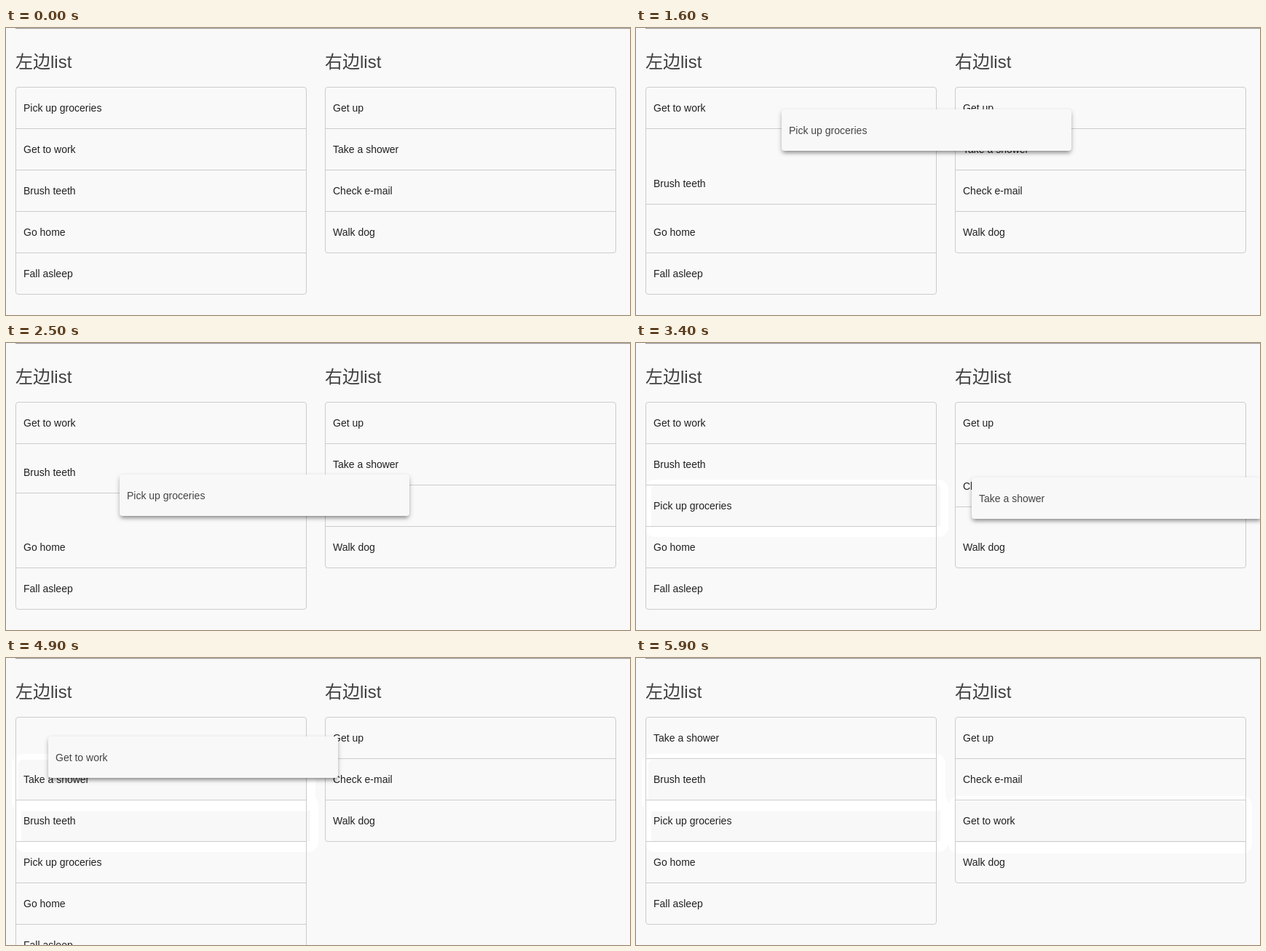
An HTML page for the animation above (6.5 s loop, 857 px wide and 395 px high).

```html
<!DOCTYPE html>
<html lang="zh-CN">
<head>
<meta charset="utf-8">
<title>Drag between lists</title>
<style>
  html, body { margin: 0; width: 100%; height: 100%; overflow: hidden; background: #f9f9f9; }
  body { position: relative; font: 14px "Liberation Sans", Arial, sans-serif; color: #212121; }
  .rule { position: absolute; left: 13px; right: 0; top: 0; height: 1px; background: #9a9a9a; border-bottom: 1px solid #eee; }
  h2 {
    position: absolute; top: 31px; margin: 0; white-space: nowrap; color: #404040;
    font: 400 24px/32px "Liberation Sans", "Noto Sans CJK SC", "Noto Sans CJK", sans-serif;
  }
  .left { left: 13px; }
  .right { left: 438px; }
  .list { position: absolute; top: 81px; width: 400px; box-sizing: border-box; border: 1px solid #ccc; border-radius: 4px; }
  .row, .preview {
    position: absolute; left: 0; top: 0; width: 398px; height: 57px; line-height: 56px;
    box-sizing: border-box; padding-left: 10px; white-space: nowrap;
  }
  .row { border-bottom: 1px solid #ccc; }
  .row.last { border-color: transparent; }
  .preview {
    margin-top: -1px; line-height: 58px; background: #f8f8f8; color: #444; border-radius: 4px;
    box-shadow: 0 5px 5px -3px rgba(0,0,0,.24), 0 3px 6px rgba(0,0,0,.28);
  }
  /* pale trace left around a dropped card */
  .halo {
    position: absolute; left: 0; top: 0; margin: -8px 0 0 -9px; box-sizing: border-box; width: 417px; height: 79px;
    background: #f8f8f8; border: solid #fff; border-width: 8px 11px 15px 9px; border-radius: 14px;
  }
</style>
</head>
<body>
<div class="rule"></div>
<h2 class="left">左边list</h2>
<h2 class="right">右边list</h2>
<script>
const LOOP = 6500, STEP = 100, SCAN = 5, SORT_MS = 250;
const ROW = 57, TOP = 82, LEFT = [14, 439], CROSS_X = 300;
const START = [
  ['Pick up groceries', 'Get to work', 'Brush teeth', 'Go home', 'Fall asleep'],
  ['Get up', 'Take a shower', 'Check e-mail', 'Walk dog']
];

// waypoints of the lifted card: [time, x, y]
const DRAGS = [
  ['Pick up groceries', [700, 18, 90], [900, 36, 165], [1100, 56, 202], [1300, 60, 219],
    [1700, 250, 93], [2000, 394, 147], [2200, 405, 148], [2700, 21, 196]],
  ['Take a shower', [3310, 439, 150], [3400, 461, 186], [3700, 320, 175], [3900, 183, 153], [4500, 17, 140]],
  ['Get to work', [4900, 58, 109], [5400, 390, 150], [5500, 440, 214], [5800, 438, 198]]
].map(([item, ...path]) => {
  const end = path[path.length - 1];
  return { item, path, from: path[0][0], to: end[0] + STEP, end };
});

const add = (cls, text = '') => {
  const el = document.createElement('div');
  el.className = cls;
  el.textContent = text;
  document.body.append(el);
  return el;
};
const place = (el, x, y) => { el.style.transform = `translate(${Math.round(x)}px, ${Math.round(y)}px)`; };
const show = (el, on) => { el.style.visibility = on ? 'visible' : 'hidden'; };

const halos = DRAGS.map(({ end }) => {
  const el = add('halo');
  place(el, end[1], end[2]);
  return el;
});
const boxes = ['left', 'right'].map(side => add('list ' + side));
const rows = Object.fromEntries(START.flat().map(name => [name, add('row', name)]));
const preview = add('preview');

// cubic-bezier(0, 0, .2, 1)
function ease(x) {
  if (x >= 1) return 1;
  let lo = 0, hi = 1, u = 0.5;
  for (let i = 0; i < 20; i++) {
    u = (lo + hi) / 2;
    if (0.6 * u * u * (1 - u) + u ** 3 < x) lo = u; else hi = u;
  }
  return 3 * u * u * (1 - u) + u ** 3;
}

// speed at a waypoint: zero at the ends and where the direction turns
function slope(path, i, axis) {
  const a = path[i - 1], b = path[i], c = path[i + 1];
  if (!a || !c || (b[axis] - a[axis]) * (c[axis] - b[axis]) <= 0) return 0;
  return (c[axis] - a[axis]) / (c[0] - a[0]);
}

function along(path, t) {
  if (t >= path[path.length - 1][0]) return path[path.length - 1].slice(1);
  const i = path.findIndex(p => p[0] > t) - 1;
  const a = path[i], b = path[i + 1], span = b[0] - a[0], s = (t - a[0]) / span;
  return [1, 2].map(axis =>
    a[axis] + (b[axis] - a[axis]) * s * s * (3 - 2 * s) +
    span * s * (1 - s) * ((1 - s) * slope(path, i, axis) - s * slope(path, i + 1, axis)));
}

// Replays the drags up to t: the card's position picks its list and slot.
function replay(t) {
  let lists = START, lifted = null;
  const shift = {};
  for (const drag of DRAGS) {
    if (t < drag.from) break;
    lifted = t < drag.to ? drag : null;
    for (let time = drag.from; time <= Math.min(t, drag.to); time += SCAN) {
      const [x, y] = along(drag.path, time);
      const side = x > CROSS_X ? 1 : 0, slot = Math.round((y - TOP) / ROW);
      const before = lists[side];
      if (before[slot] === drag.item) continue;
      lists = lists.map(list => list.filter(name => name !== drag.item));
      lists[side].splice(slot, 0, drag.item);
      // only sorting inside one list is animated
      if (!before.includes(drag.item)) continue;
      const rest = 1 - ease((t - time) / SORT_MS);
      lists[side].forEach((name, i) => {
        shift[name] = (shift[name] || 0) + (before.indexOf(name) - i) * ROW * rest;
      });
    }
  }
  return { lists, lifted, shift };
}

function draw(t) {
  const { lists, lifted, shift } = replay(t);
  lists.forEach((list, side) => {
    boxes[side].style.height = list.length * ROW + 1 + 'px';
    list.forEach((name, i) => {
      const el = rows[name];
      place(el, LEFT[side], TOP + i * ROW + (shift[name] || 0));
      el.classList.toggle('last', i === list.length - 1);
      show(el, !lifted || lifted.item !== name);
    });
  });
  show(preview, lifted);
  if (lifted) {
    preview.textContent = lifted.item;
    place(preview, ...along(lifted.path, t));
  }
  halos.forEach((el, i) => show(el, t >= DRAGS[i].to));
}

let drawn = -1;
function tick() {
  const t = Math.floor(performance.now() % LOOP / STEP) * STEP;
  if (t !== drawn) draw(drawn = t);
  requestAnimationFrame(tick);
}
tick();
</script>
</body>
</html>
```
